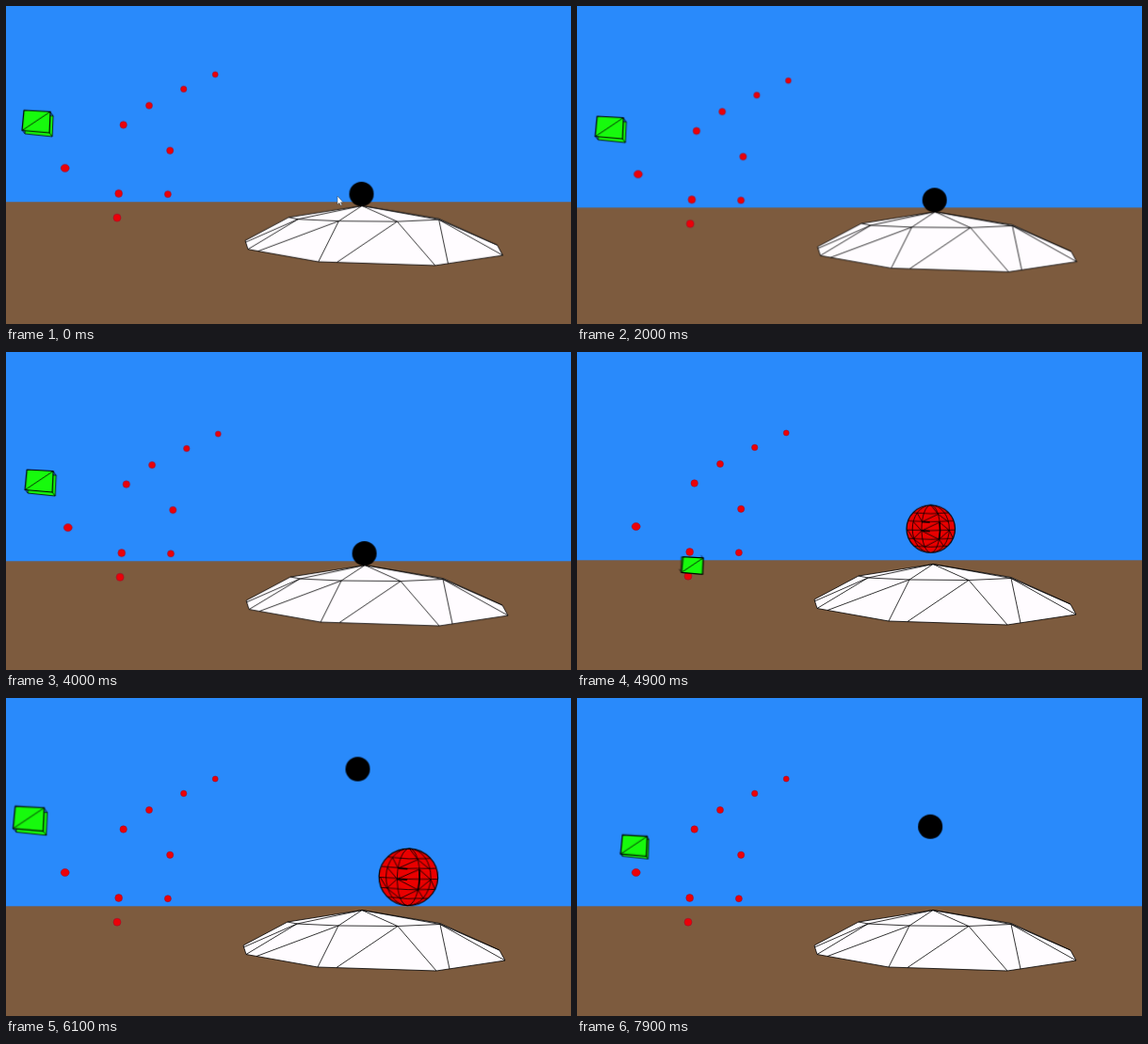
An HTML page without scripts for the animation above (8 s loop, 600 px wide and 338 px high).

```html
<!DOCTYPE html>
<html lang="en">
<head>
<meta charset="utf-8">
<title>Dome scene</title>
<style>
html, body { margin: 0; width: 100%; height: 100%; overflow: hidden; background: #298afb; }
svg { display: block; width: 100%; height: 100%; }
.wire { stroke: #000; stroke-width: .8; stroke-linejoin: round; }
.wire * { vector-effect: non-scaling-stroke; }
.cam, .dome, .ball, .orb, .cursor { animation: 8s linear infinite; }
.cam { animation-name: cam; }
.dome { animation-name: dome; transform-origin: 378px 225px; }
.ball { animation-name: ball; }
.orb { animation-name: orb; }
.cursor { animation-name: cursor; }
.cube { animation: cube 2s linear infinite; }
.side { animation: side 2s linear infinite; }

@keyframes cam {
  0%, 20% { transform: translate(0, -13.2px); }
  25% { transform: translate(2.2px, -6.8px); }
  27.5%, 29% { transform: translate(3px, 6px); }
  35%, 51% { transform: translate(3.1px, 1.1px); }
  60%, 100% { transform: none; }
}
@keyframes dome {
  0%, 20% { transform: scale(.984); }
  25% { transform: scale(.99); }
  35%, 100% { transform: none; }
}
/* rests on the apex, then drops in again from above */
@keyframes ball {
  0%, 53.75% { transform: translate(377.5px, 213px); }
  53.76%, 68% { transform: translate(372px, -24px); }
  72.5% { transform: translate(373px, 36px); }
  76.25% { transform: translate(373.5px, 75.5px); }
  83.75% { transform: translate(374px, 106px); }
  88.75% { transform: translate(374.7px, 117px); }
  98.75% { transform: translate(375.2px, 136.7px); }
  100% { transform: translate(375.3px, 139px); }
}
/* rolls down the dome towards the viewer */
@keyframes orb {
  0%, 53.75% { opacity: 0; transform: translate(377.5px, 212px) rotate(0deg) scale(.27, .27); }
  53.76% { opacity: 1; transform: translate(377.5px, 212px) rotate(0deg) scale(.27, .27); }
  61.25% { opacity: 1; transform: translate(375.7px, 188px) rotate(0deg) scale(.515, .505); }
  76.25% { opacity: 1; transform: translate(427.3px, 190.3px) rotate(2deg) scale(.625, .605); }
  83.75% { opacity: 1; transform: translate(472px, 220px) rotate(5deg) scale(.75, .71); }
  88.75% { opacity: 1; transform: translate(521px, 246px) rotate(9deg) scale(.895, .805); }
  93.75% { opacity: 1; transform: translate(590px, 253px) rotate(12deg) scale(1.1, 1); }
  97.5% { opacity: 1; transform: translate(655px, 255px) rotate(15deg) scale(1.25, 1.08); }
  98.6%, 100% { opacity: 0; transform: translate(700px, 256px) rotate(16deg) scale(1.3, 1.1); }
}
@keyframes cursor {
  0%, 17.5% { opacity: 1; }
  17.51%, 100% { opacity: 0; }
}
/* leaves past the left edge and starts over at the lowest dot */
@keyframes cube {
  0% { opacity: 1; transform: translate(32.2px, 136px) scale(1); }
  5% { opacity: 1; transform: translate(24.5px, 128.5px) scale(1.1); }
  12% { opacity: 1; transform: translate(-35px, 92px) scale(1.4); }
  12.1%, 43.9% { opacity: 0; transform: translate(122.5px, 228px) scale(.77); }
  44% { opacity: 1; transform: translate(122.5px, 228px) scale(.77); }
  45% { opacity: 1; transform: translate(122.5px, 227px) scale(.77); }
  55% { opacity: 1; transform: translate(120px, 222.2px) scale(.77); }
  80% { opacity: 1; transform: translate(93px, 190px) scale(.84); }
  90% { opacity: 1; transform: translate(72px, 168px) scale(.9); }
  95% { opacity: 1; transform: translate(60.7px, 157px) scale(.94); }
  100% { opacity: 1; transform: translate(32.2px, 136px) scale(1); }
}
@keyframes side {
  0%, 12% { transform: none; }
  44%, 60% { transform: translate(-3px, -4px); }
  95% { transform: translate(-1px, -1px); }
  100% { transform: none; }
}
</style>
</head>
<body>
<svg viewBox="0 0 600 338" preserveAspectRatio="none">
  <rect width="600" height="338" fill="#298afb"/>
  <g class="cam">
    <rect x="-10" y="221.3" width="620" height="160" fill="#7d5b3e"/>

    <g class="dome wire" fill="none">
      <path fill="#fffcff" d="M378 225.500L299 238L252 263L255 272.500L331 286L457 290L530 279L524 268L461 239.500Z"/>
      <path d="M299 238L309 240L353 242L416 242.500L461 240.500
        M309 240L378 225.500L353 242M378 225.500L416 242.500M378 225.500L461 240.500
        M252 265L309 240L255 272.500M266 274.500L353 242L331 286
        M351 286.500L416 242.500L457 290M471 288L461 240.500L530 279M461 240.500L524 268"/>
    </g>

    <g fill="#ec0008" stroke="#8c1030" stroke-width=".5">
      <circle cx="222.200" cy="86" r="3"/>
      <circle cx="188.700" cy="101.500" r="3.200"/>
      <circle cx="152" cy="119" r="3.500"/>
      <circle cx="124.700" cy="139.500" r="3.700"/>
      <circle cx="174.200" cy="166.800" r="3.600"/>
      <ellipse cx="62.700" cy="185.500" rx="4.500" ry="4"/>
      <circle cx="119.700" cy="212.500" r="3.900"/>
      <circle cx="171.900" cy="213.200" r="3.500"/>
      <circle cx="118" cy="238.200" r="4"/>
    </g>

    <g class="ball"><circle r="13"/></g>

    <g class="orb wire" fill="none">
      <circle r="50" fill="#ea0000" stroke-width="1.2"/>
      <ellipse rx="19" ry="50"/>
      <ellipse rx="38" ry="50"/>
      <path d="M-36 -34Q0 -30 36 -34M-47 -17Q0 -13 47 -17M-50 2Q0 5 50 2M-46 20Q0 24 46 20M-34 36Q0 40 34 36"/>
      <path d="M-28 -33L-18 -15L15 -31L36 -15M-36 -15L-19 4L18 -14L38 3M-48 2L-36 21L-19 4L17 22L38 3L46 20M-36 21L-13 38L17 22L27 37M0 -50L15 -31"/>
      <path stroke-width="1.6" d="M18 -14L19 4L17 22M-19 4L-2 5M-18 -15L-2 -14"/>
    </g>

    <g class="cube wire" fill="#17fa0d">
      <g class="side">
        <path d="M-12 -8L18 -6L17 16L-12 13Z"/>
        <path d="M14 12L17 16M15 -10L18 -6M-15 9L-12 13"/>
      </g>
      <path stroke-width="1.2" d="M-13 -12L15 -10.500L14 12L-15 9.500Z"/>
      <path d="M-15 9.500L15 -10.500"/>
    </g>
  </g>

  <path class="cursor" d="M352 202V211L354 209.300L355.500 212L356.700 211.400L355.500 208.700H358Z" fill="#fff" stroke="#345" stroke-width=".5"/>
</svg>
</body>
</html>
```
